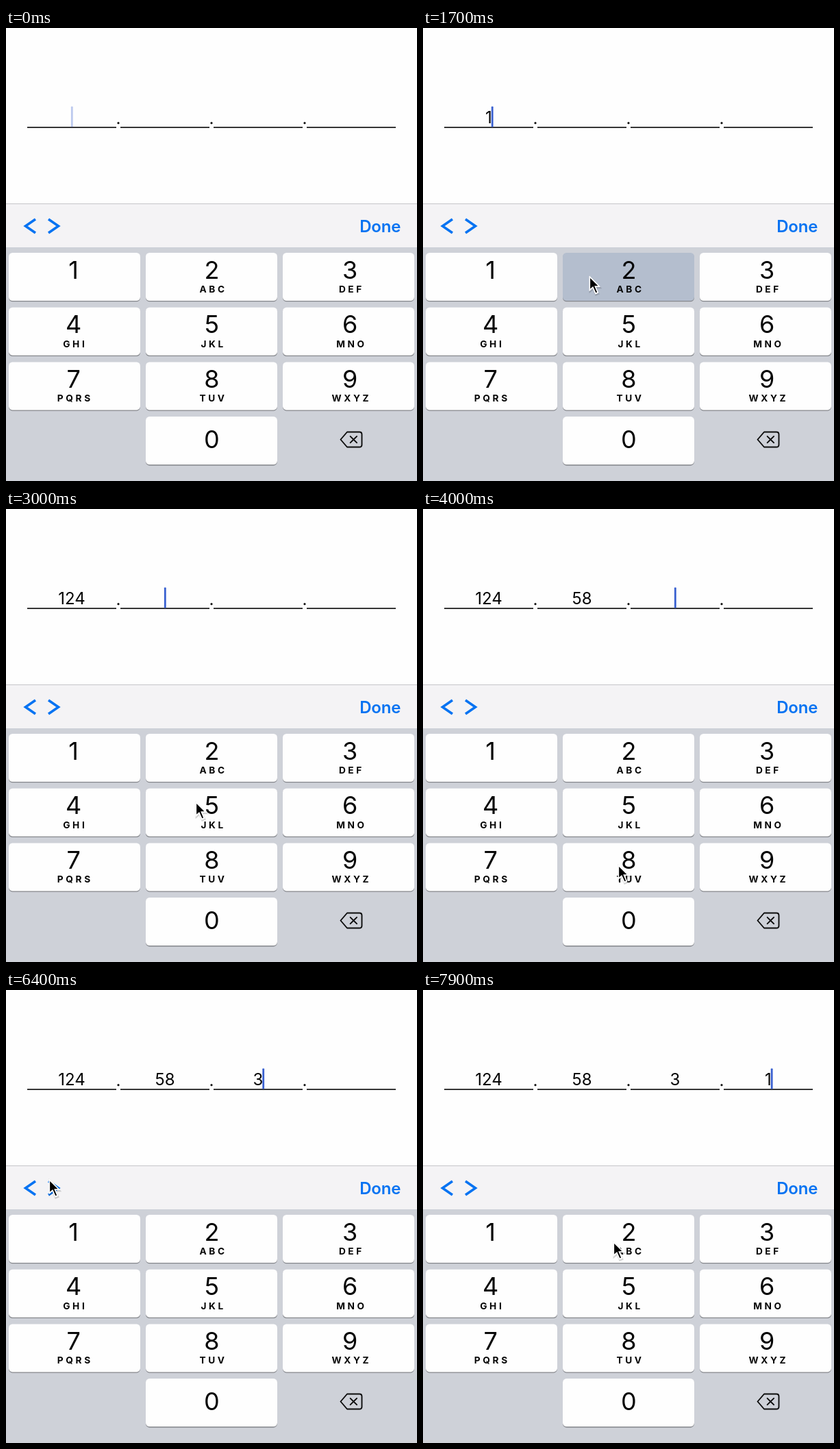
Recreate the animation shown at these times as an HTML page. Size 600 px wide and 661 px high, loop 8000 ms.

```html
<!DOCTYPE html>
<html lang="en">
<head>
<meta charset="utf-8">
<title>Address entry</title>
<style>
  html, body { margin: 0; width: 100%; height: 100%; overflow: hidden; background: #fefefe; }
  svg { display: block; width: 600px; height: 661px; font-family: Inter, Roboto, "Liberation Sans", sans-serif; }
  text { text-anchor: middle; fill: #060606; }
  .digit { font-size: 36px; }
  .sub { font-size: 13.7px; font-weight: 700; letter-spacing: 3.6px; }
  .value { font-size: 24px; }
  .done { font-size: 24px; font-weight: 600; letter-spacing: -.2px; text-anchor: end; fill: #0673f2; }
  .line { fill: none; stroke-linecap: round; stroke-linejoin: round; }
  .blue { stroke: #0673f2; stroke-width: 3.6; stroke-linecap: butt; stroke-linejoin: miter; }
</style>
</head>
<body>
<svg viewBox="0 0 600 661">
  <rect width="600" height="661" fill="#fefefe"/>
  <g id="fields"></g>
  <rect id="caret" y="114.5" width="2.8" height="30" rx=".8" fill="#3960d0"/>
  <rect y="256" width="600" height="64" fill="#f4f3f5"/>
  <rect y="256" width="600" height="1" fill="#c6c6c9"/>
  <path class="line blue" d="M43 279L28.5 289L43 299"/>
  <path id="next" class="line blue" d="M62 279L76.5 289L62 299"/>
  <text class="done" x="576.2" y="297.5">Done</text>
  <rect y="320" width="600" height="341" fill="#ced1d8"/>
  <g id="keys"></g>
  <g class="line" stroke="#0c0c0c" stroke-width="1.9">
    <path d="M498 589.5H516Q519.5 589.5 519.5 593V608Q519.5 611.5 516 611.5H498L488.5 600.5Z"/>
    <path d="M502.7 595.8l9.4 9.4m0 -9.4l-9.4 9.4"/>
  </g>
  <g id="cursor">
    <path d="M0 0V20.5L4.6 16.4L8.4 25L12.3 23.3L8.6 15H14.6Z" transform="translate(.6 1.6)" opacity=".16" stroke="#000" stroke-width="2"/>
    <path d="M0 0V20.5L4.6 16.4L8.4 25L12.3 23.3L8.6 15H14.6Z" fill="#fff" stroke="#fff" stroke-linejoin="round"/>
    <path d="M1.1 2.8V17.9L5 14.4L9 23.3L10.7 22.5L6.9 13.8H12Z"/>
  </g>
</svg>
<script>
const LOOP = 8000, STEP = 100, HOLD = 200, SETTLE = 100;
const $ = id => document.getElementById(id);

function add(parent, tag, attrs, text = "") {
  const el = document.createElementNS("http://www.w3.org/2000/svg", tag);
  for (const k in attrs) el.setAttribute(k, attrs[k]);
  el.textContent = text;
  return parent.appendChild(el);
}

// Four underlined fields with dots between them
const centers = [0, 1, 2, 3].map(i => 96 + i * 136);
const values = centers.map((x, i) => {
  add($("fields"), "rect", { x: x - 65, y: 144.2, width: 130, height: 1.7, fill: "#141414" });
  if (i < 3) add($("fields"), "circle", { cx: x + 68, cy: 138.7, r: 1.6, fill: "#141414" });
  return add($("fields"), "text", { class: "value", x, y: 139.3 });
});

// Number pad
const keys = {};
function addKey(digit, col, row, label) {
  const x = 4 + col * 200, y = 328 + row * 79.7, cx = 98.6 + col * 201.8;
  const box = { x, width: 192, height: 70, rx: 5.5 };
  add($("keys"), "rect", { ...box, y: y + 1.3, fill: "#85878c" });
  keys[digit] = add($("keys"), "rect", { ...box, y, fill: "#fefefe" });
  const base = label === undefined ? y + 46 : y + 37.6;
  add($("keys"), "text", { class: "digit", x: cx, y: base }, digit);
  if (label) add($("keys"), "text", { class: "sub", x: cx + 2.2, y: y + 58 }, label);
}
",ABC,DEF,GHI,JKL,MNO,PQRS,TUV,WXYZ".split(",")
  .forEach((label, i) => addKey(i + 1, i % 3, Math.floor(i / 3), label));
addKey(0, 1, 3);

// Where the pointer goes and when it presses there
const stops = [
  { down: 0, x: 150, y: 388 },
  { down: 1000, x: 91, y: 370, key: 1 },
  { down: 1700, x: 243, y: 362, key: 2 },
  { down: 2400, x: 99, y: 434, key: 4 },
  { down: 3100, x: 277, y: 427, key: 5 },
  { down: 3700, x: 285, y: 519, key: 8 },
  { down: 5000, x: 476, y: 367, key: 3 },
  { down: 6500, x: 63, y: 276, key: "next" },
  { down: 7200, x: 91, y: 378, key: 1 },
  { down: LOOP, x: 278, y: 367 }
];

// Each move ends just before its press; longer ways take longer
function pointer(t) {
  const i = stops.findIndex(s => t < s.down + HOLD);
  const to = stops[i], from = stops[i - 1] || to;
  const end = to.down - SETTLE;
  const dist = Math.hypot(to.x - from.x, to.y - from.y);
  const begin = Math.max(from.down + HOLD, end - 300 - dist);
  const p = Math.min(1, Math.max(0, (t - begin) / (end - begin)));
  const e = i ? p * p * (3 - 2 * p) : 0;
  return [from.x + (to.x - from.x) * e, from.y + (to.y - from.y) * e];
}

// Caret stays on, fades out, rests, fades in
function blink(dt) {
  const d = dt % 1000;
  if (d <= 550) return 1;
  if (d < 700) return (700 - d) / 150;
  return d < 850 ? 0 : (d - 850) / 150;
}

function draw(t) {
  const text = ["", "", "", ""];
  let field = 0, last = -650, held;
  for (const { down, key } of stops) {
    if (!key || t < down) continue;
    if (t < down + HOLD) { held = key; continue; }
    last = down + HOLD;
    if (key === "next") { field++; continue; }
    text[field] += key;
    // A field is full once another digit would pass 255
    if (+text[field] > 25) field++;
  }
  values.forEach((el, i) => el.textContent = text[i]);
  const half = text[field] ? values[field].getComputedTextLength() / 2 : 0;
  $("caret").setAttribute("x", centers[field] + half - 1.1);
  $("caret").setAttribute("opacity", blink(t - last));
  for (const k in keys) keys[k].setAttribute("fill", String(held) === k ? "#b4bece" : "#fefefe");
  $("next").setAttribute("opacity", held === "next" ? .3 : 1);
  $("cursor").setAttribute("transform", `translate(${pointer(t)}) scale(1.04)`);
  $("cursor").setAttribute("visibility", t < HOLD ? "hidden" : "visible");
}

const start = performance.now();
function tick() {
  const t = (performance.now() - start) % LOOP;
  draw(Math.floor(t / STEP) * STEP);
  requestAnimationFrame(tick);
}
tick();
</script>
</body>
</html>
```
